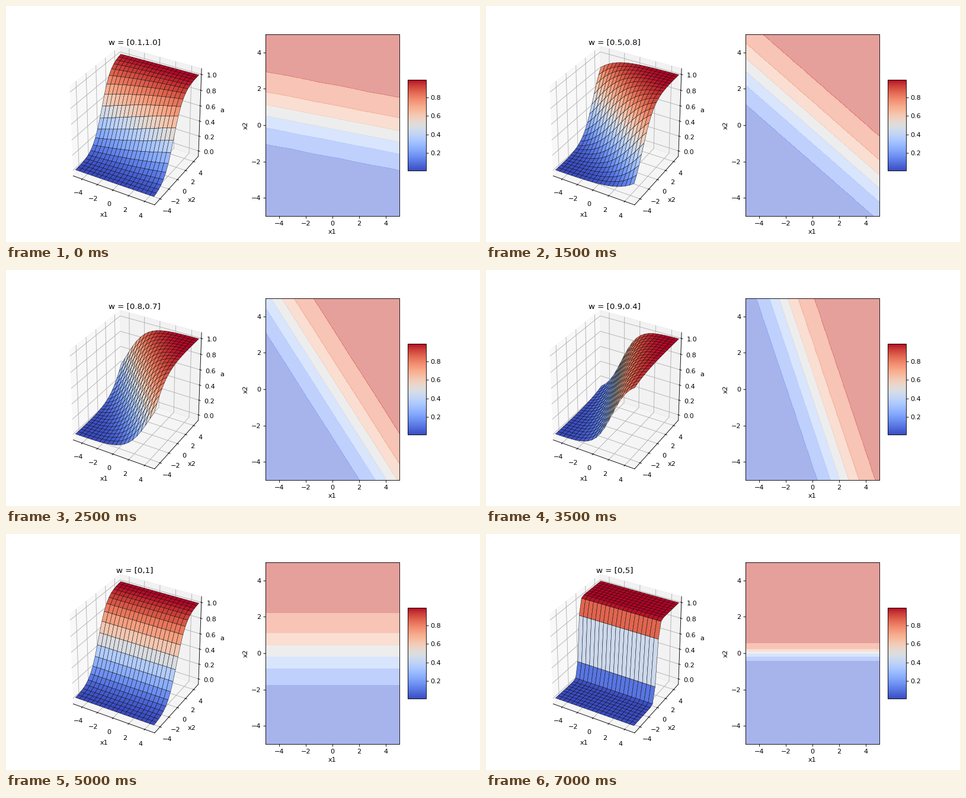
Animation of 800x400 px, one loop 7500 ms. Source, as a matplotlib script:

```python
import numpy as np
import matplotlib.pyplot as plt
from matplotlib.animation import FuncAnimation
from matplotlib.cm import ScalarMappable
from matplotlib.colors import Normalize

CMAP = "coolwarm"
LEVELS = np.arange(8) * 0.15
TICKS = np.arange(-4, 5, 2)
TURNS = 10  # weight vector rotates first, then grows

W, H = 800, 400
fig = plt.figure(figsize=(W / 80, H / 80), dpi=80)

axis = np.linspace(-5, 5, 20)
X1, X2 = np.meshgrid(axis, axis)


def neuron(w1, w2):
    return 1 / (1 + np.exp(-(w1 * X1 + w2 * X2)))


def cell_means(z):
    """Mean height of each cell, its first corner counted twice."""
    total = 2 * z[:-1, :-1] + z[:-1, 1:] + z[1:, 1:] + z[1:, :-1]
    return total.ravel() / 5


def weights(i):
    if i < TURNS:
        angle = (i + 1) * np.pi / 22
        w1, w2 = np.sin(angle), np.cos(angle)
        return w1, w2, f"w = [{w1:.1f},{w2:.1f}]"
    w2 = i - TURNS + 1
    return 0, w2, f"w = [0,{w2}]"


# 3D view: a cube stretched to a panel that is not square
col = 0.775 / 2.2
ax3 = fig.add_axes([0.095, 0.11, col, 0.77], projection="3d")
ax3.apply_aspect = lambda position=None: None
ax3.set_box_aspect((1, 1, 1), zoom=np.sqrt(3) / 1.8294640721620434)
ax3.view_init(elev=30, azim=-60)
ax3.set(xlabel="x1", ylabel="x2", zlabel="a")
ax3.set_xticks(TICKS)
ax3.set_yticks(TICKS)
ax3.set_zticks(np.arange(6) / 5)
ax3.set_xlim(-5, 5, view_margin=1 / 48)
ax3.set_ylim(-5, 5, view_margin=1 / 48)
ax3.set_zlim(-0.05, 1.05, view_margin=1 / 48)
title = fig.text(0.095 + col / 2, 0.11 + 0.92 * 0.77 + 20 / 3 / H, "",
                 fontsize=12, ha="center", va="baseline")

# Contour map
left = 0.9 - col
ax2 = fig.add_axes([left, 0.11, 0.8 * col, 0.77])
ax2.set(xlabel="x1", ylabel="x2", xticks=TICKS, yticks=TICKS,
        xlim=(-5, 5), ylim=(-5, 5))

# Colour bar, five times as tall as wide
means = cell_means(neuron(0, 1))
cax = fig.add_axes([left + 0.85 * col, 0.3025, 0.385 / 5 * H / W, 0.385])
fig.colorbar(ScalarMappable(Normalize(means.min(), means.max()), CMAP),
             cax=cax, ticks=[0.2, 0.4, 0.6, 0.8])

drawn = []


def update(i):
    while drawn:
        drawn.pop().remove()
    w1, w2, text = weights(i)
    z = neuron(w1, w2)
    title.set_text(text)
    surf = ax3.plot_surface(X1, X2, z, cmap=CMAP, edgecolor="k",
                            linewidth=0.4)
    surf.set_array(cell_means(z))
    surf.autoscale()
    fill = ax2.contourf(X1, X2, z, LEVELS, cmap=CMAP, alpha=0.5)
    drawn.extend([surf, fill])
    return drawn


anim = FuncAnimation(fig, update, frames=15, interval=500,
                     init_func=lambda: [], repeat=True, repeat_delay=0,
                     blit=False)
plt.show()
```
